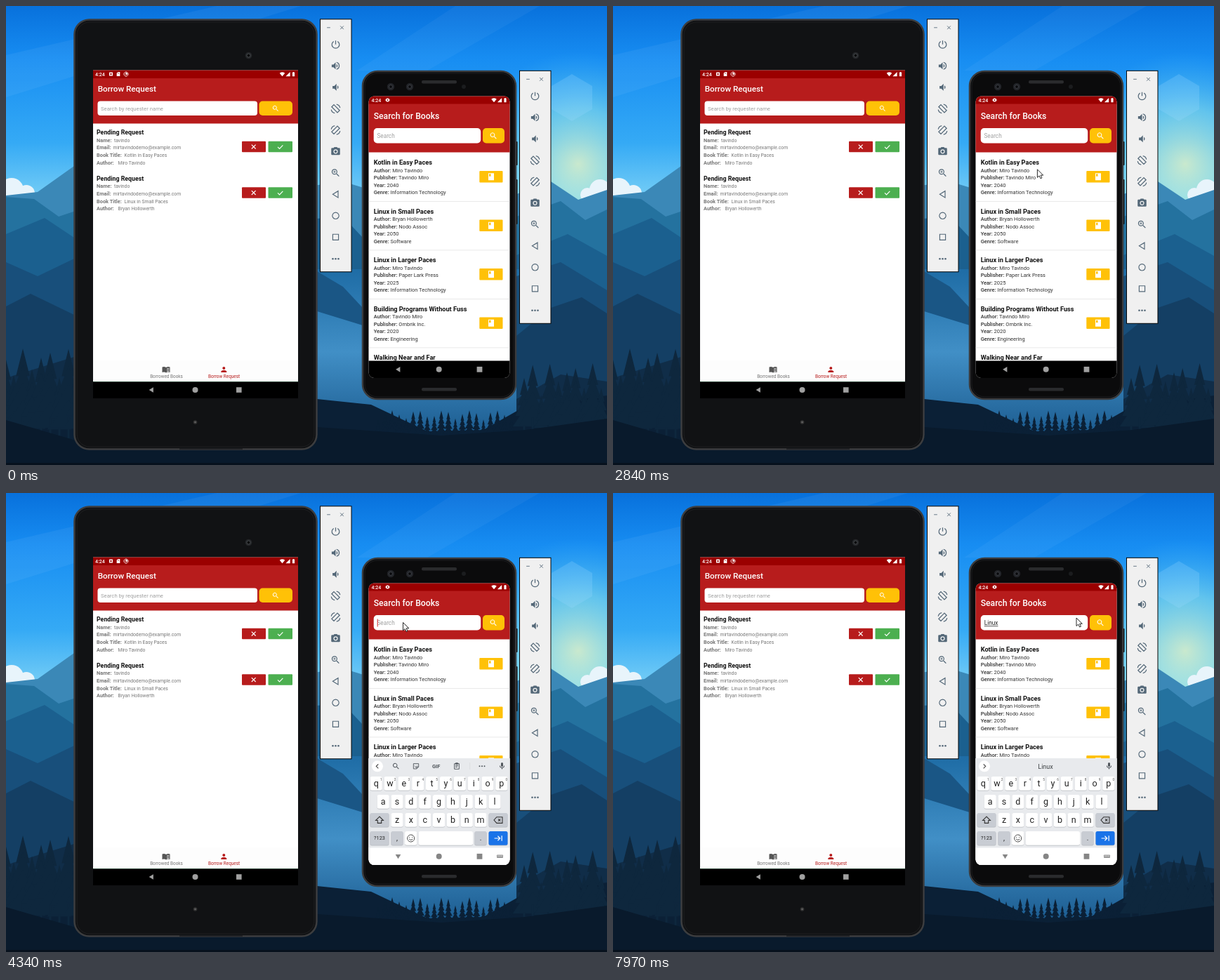
Write an HTML page that moves like this. It is 856 px wide and 654 px high and loops after 8000 ms.

```html
<!DOCTYPE html>
<html lang="en">
<head>
<meta charset="utf-8">
<title>Library app demo</title>
<style>
html, body { margin: 0; width: 100%; height: 100%; overflow: hidden; background: #0b2036; }
svg { display: block; font-family: Roboto, Arial, sans-serif; }
</style>
</head>
<body>
<svg id="stage" width="856" height="654" viewBox="0 0 856 654"></svg>
<script>
const LOOP = 8000, RED = '#b71c1c', DARK_RED = '#9b0000', YELLOW = '#ffc107', SLATE = '#546878';

// Drawing helpers that return SVG markup
const rect = (x, y, w, h, fill, r = 0, more = '') =>
  `<rect x="${x}" y="${y}" width="${w}" height="${h}" fill="${fill}" rx="${r}" ${more}/>`;
const dot = (x, y, r, fill, more = '') => `<circle cx="${x}" cy="${y}" r="${r}" fill="${fill}" ${more}/>`;
const poly = (points, fill, more = '') => `<polygon points="${points}" fill="${fill}" ${more}/>`;
const text = (x, y, size, str, fill = '#333', weight = 400, anchor = 'start') =>
  `<text x="${x}" y="${y}" font-size="${size}" fill="${fill}" font-weight="${weight}" text-anchor="${anchor}">${str}</text>`;
const group = (id, body, more = '') => `<g id="${id}" ${more}>${body}</g>`;
const many = (n, f) => Array.from({ length: n }, (_, i) => f(i)).join('');

// Icons live on a 24 unit grid; a stroke width makes them outlines
const ICON = {
  search: 'M15.5 14h-.8l-.3-.3A6.5 6.5 0 1 0 9.5 16c1.6 0 3.1-.6 4.2-1.6l.3.3v.8l5 5 1.5-1.5zM9.5 14a4.5 4.5 0 1 1 0-9 4.5 4.5 0 0 1 0 9z',
  close: 'M5 5 19 19M19 5 5 19',
  check: 'M4 12.5l5.5 5.5L20 7',
  minus: 'M4 12H20',
  power: 'M12 3v9M7.5 5a8.5 8.5 0 1 0 9 0',
  loud: 'M3 9v6h4l5 5V4L7 9zM16.5 12A4.5 4.5 0 0 0 14 8v8a4.5 4.5 0 0 0 2.500-4zM14 3.200v2.100a7 7 0 0 1 0 13.400v2.100a9 9 0 0 0 0-17.600z',
  quiet: 'M5 9v6h4l5 5V4L9 9zM18.500 12A4.500 4.500 0 0 0 16 8v8a4.500 4.500 0 0 0 2.500-4z',
  left: 'M8 3 21 16 16 21 3 8ZM14 2a10 10 0 0 1 8 8M10 22a10 10 0 0 1-8-8',
  right: 'M16 3 3 16 8 21 21 8ZM10 2a10 10 0 0 0-8 8M14 22a10 10 0 0 0 8-8',
  camera: 'M9 2 7.200 4H4a2 2 0 0 0-2 2v12a2 2 0 0 0 2 2h16a2 2 0 0 0 2-2V6a2 2 0 0 0-2-2h-3.200L15 2zM12 7a5 5 0 1 1 0 10 5 5 0 0 1 0-10zM12 9a3 3 0 1 0 0 6 3 3 0 0 0 0-6z',
  plus: 'M9.500 7v5M7 9.500h5',
  back: 'M18 4V20L5 12Z',
  ring: 'M12 4a8 8 0 1 0 .01 0Z',
  square: 'M5 5H19V19H5Z',
  wifi: 'M0 8Q12-1 24 8L12 22Z',
  signal: 'M2 22H22V2Z',
  battery: 'M7 4h3V2h4v2h3v18H7Z',
  gear: 'M12 3l2 3 4-1 1 4 3 3-3 3-1 4-4-1-2 3-2-3-4 1-1-4-3-3 3-3 1-4 4 1zM12 9a3 3 0 1 0 0 6 3 3 0 0 0 0-6z',
  card: 'M10 2h10v20H4V8zM9 6v4h2V6zm4 0v4h2V6z',
  book: 'M4 2H20V22H4ZM6 4v8l2.500-2 2.500 2V4Z',
  reader: 'M1 5q6-2 11 1 5-3 11-1v15q-6-2-11 1-5-3-11-1ZM14 9v1.500l7-1V8zm0 4v1.500l7-1V12zm0 4v1.500l7-1V16z',
  person: 'M12 12a4 4 0 1 0 0-8 4 4 0 0 0 0 8zM12 14c-3 0-8 1.300-8 4v2h16v-2c0-2.700-5-4-8-4z',
  mic: 'M12 14a3 3 0 0 0 3-3V5a3 3 0 0 0-6 0v6a3 3 0 0 0 3 3zM17 11a5 5 0 0 1-10 0H5a7 7 0 0 0 6 7v3h2v-3a7 7 0 0 0 6-7z',
  sticker: 'M4 4H20V14L14 20H4ZM20 14H14V20M8 9v1M15 9v1M8 13q4 4 7 0',
  clip: 'M5 5H19V21H5ZM9 3h6v4H9ZM8 11h8M8 15h6',
  smile: 'M12 2a10 10 0 1 0 .01 0ZM8 8v2M16 8v2M7 14q5 6 10 0',
  shift: 'M12 3 2 13H7V20H17V13H22Z',
  erase: 'M8 4H23V20H8L1 12ZM12 9l6 6M18 9l-6 6',
  next: 'M2 12H17M11 6l6 6-6 6M21.500 5V19'
};
const icon = (name, x, y, size, color, stroke) =>
  `<path d="${ICON[name]}" transform="translate(${x - size / 2} ${y - size / 2}) scale(${size / 24})" fill-rule="evenodd" ` +
  (stroke ? `fill="none" stroke="${color}" stroke-width="${stroke}"/>` : `fill="${color}"/>`);
const dots = (x, y, color, gap = 4, r = 1.3) => many(3, i => dot(x + (i - 1) * gap, y, r, color));

const pine = (x, base, h, fill) => many(4, i => {
  const top = base - h * (1 - i * .2), w = h * (.08 + i * .045), low = top + h * .32;
  return poly(`${x},${top} ${x + w},${low} ${x - w},${low}`, fill);
}) + rect(x - 1.5, base - h * .2, 3, h * .25, fill);

const landscape = () => `
  <defs>
    <linearGradient id="sky" x2="0" y2="1"><stop stop-color="#0871dc"/><stop offset=".25" stop-color="#178df2"/>
      <stop offset=".65" stop-color="#35aaf5"/><stop offset="1" stop-color="#8cdaf6"/></linearGradient>
    <radialGradient id="glow"><stop stop-color="#e8f5c4" stop-opacity=".8"/><stop offset=".5" stop-color="#9ae8e6" stop-opacity=".5"/>
      <stop offset="1" stop-color="#4cc0f5" stop-opacity="0"/></radialGradient>
    <linearGradient id="lake" x2="0" y2="1"><stop stop-color="#1e6ca5"/><stop offset=".5" stop-color="#418fc6"/><stop offset="1" stop-color="#1c5c90"/></linearGradient>
    <clipPath id="screen">${rect(516.5, 128.5, 201, 401.5, '#000', 8)}</clipPath>
  </defs>` +
  rect(0, 0, 856, 300, 'url(#sky)') +
  poly('0,130 0,70 300,0 420,0', '#fff', 'opacity=".05"') + poly('500,92 640,0 760,0 600,92', '#fff', 'opacity=".04"') +
  dot(815, 225, 160, 'url(#glow)') +
  poly('806,97 835,114 835,147 806,164 777,147 777,114', '#9fdcff', 'opacity=".22"') +
  dot(8, 262, 17, '#e8f4fb') + dot(29, 267, 12, '#e8f4fb') + dot(846, 262, 15, '#e8f4fb') + dot(828, 269, 10, '#e8f4fb') +
  poly('0,270 45,265 97,228 200,290 480,250 640,300 776,250 815,276 856,262 856,400 0,400', '#3b88b7') +
  poly('0,272 40,275 75,300 120,285 500,330 727,300 790,278 825,305 856,290 856,440 0,440', '#24729f') +
  poly('0,325 55,302 97,330 480,300 508,330 727,355 800,325 856,356 856,500 0,500', '#1b608f') +
  rect(400, 375, 350, 235, 'url(#lake)') +
  poly('0,365 45,385 97,360 97,520 0,520', '#184f7b') + poly('727,385 790,365 856,405 856,520 727,520', '#184f7b') +
  poly('443,378 480,400 508,430 508,455 443,435', '#1a5685') +
  poly('0,428 35,410 97,440 97,640 0,640', '#143f64') + poly('727,470 776,430 820,415 856,438 856,640 727,640', '#143f64') +
  poly('0,530 97,500 97,654 0,654', '#102d48') + poly('727,560 790,525 856,535 856,654 727,654', '#102d48') +
  poly('443,560 520,568 600,606 680,604 740,570 856,555 856,654 0,654 0,575', '#0b2036') +
  many(9, i => pine(-2 + i * 13, 610, 72 + 50 * Math.abs(Math.sin(i * 1.9 + 1)), '#0e273d')) +
  many(20, i => pine(530 + i * 10, 612, 22 + 14 * Math.abs(Math.sin(i * 2.3)), '#0b2036')) +
  many(10, i => pine(738 + i * 12.2, 605, 48 + 48 * Math.abs(Math.sin(i * 1.3 + .6)), '#0e273d')) +
  poly('0,590 120,625 443,600 620,612 740,604 856,588 856,654 0,654', '#091a2c') +
  rect(0, 651, 856, 3, '#07111d');

const controls = (x, y) => group('', rect(.5, .5, 44.5, 360, '#f0f0f0', 0, 'stroke="#050505"') +
  icon('minus', 12.5, 12.5, 7, SLATE, 3) + icon('close', 31.5, 12.5, 8, SLATE, 2.8) +
  ['power', 'loud', 'quiet', 'left', 'right', 'camera', 'search', 'back', 'ring', 'square'].map((name, i) =>
    icon(name, 22.5, 36.5 + i * 30.5, i > 6 ? 14 : 15, SLATE, /power|left|right|back|ring|square/.test(name) && 2)).join('') +
  icon('plus', 22.5, 219.500, 15, SLATE, 1.5) + dots(22.5, 342, SLATE), `transform="translate(${x} ${y})"`);

const statusRight = (x, y) => icon('wifi', x - 16, y, 7.5, '#fff') + icon('signal', x - 8, y, 7.5, '#fff') + icon('battery', x, y, 7.5, '#fff');

const request = (y, title, author) =>
  text(129, y, 8.8, 'Pending Request', '#111', 700) +
  [['Name:', 'tavindo', 154], ['Email:', 'mirtavindodemo@example.com', 152.5], ['Book Title:', title, 168.5], ['Author:', author, 159.5]]
    .map(([label, value, x], i) => text(129, y + 10.5 + i * 10.6, 7.4, label, '#777', 700) + text(x, y + 10.5 + i * 10.6, 6.8, value, '#777')).join('') +
  rect(336, y + 9.5, 34, 15.5, RED, 1) + icon('close', 352.7, y + 17.3, 10, '#fff', 2.8) +
  rect(373.5, y + 9.5, 34.5, 15.5, '#4caf50', 1) + icon('check', 390.7, y + 17.3, 11, '#fff', 2.5);

const tablet = () =>
  rect(97.500, 19.500, 345, 612, '#111214', 21, 'stroke="#3c3d3f" stroke-width="2.5"') +
  rect(101, 23, 338, 605, 'none', 18, 'stroke="#1e1f21"') + rect(247, 630, 90, 2, '#202124') +
  dot(345.5, 70.5, 4.8, '#25272a') + dot(345.5, 70.5, 2.5, '#0a0b0d', 'stroke="#44474a"') +
  dot(269.5, 593, 2.8, '#333') + dot(269.5, 593, 1.2, '#666') +
  rect(124, 91.5, 292, 467.5, '#fff') + rect(124, 91.5, 292, 12, DARK_RED) + rect(124, 103, 292, 64.5, RED) +
  text(127, 99.700, 7, '4:24', '#fff', 500) + rect(147, 94.500, 5, 5, '#fff', .5) + dot(149.5, 97, 1.2, DARK_RED) +
  icon('card', 160, 97, 7, '#fff') + icon('ring', 171, 97, 9, '#fff', 2.5) + dot(171.5, 96.500, 1.500, '#fff') + statusRight(409.5, 97) +
  text(130.7, 122, 11.7, 'Borrow Request', '#fff', 500) +
  rect(130.5, 135.5, 227.5, 20.5, '#fff', 4) + text(135, 148.5, 7.7, 'Search by requester name', '#a0a0a0') +
  rect(360.5, 135.5, 47.5, 20.5, YELLOW, 5) + icon('search', 384, 146, 11, '#fff') +
  request(183.3, 'Kotlin in Easy Paces', 'Miro Tavindo') + request(248.8, 'Linux in Small Paces', 'Bryan Hollowerth') +
  rect(124, 505, 292, 30, '#fdfdfd') +
  icon('reader', 228, 518, 12, '#555') + text(228.5, 530, 6.4, 'Borrowed Books', '#777', 400, 'middle') +
  icon('person', 310.300, 518, 12, RED) + text(310.5, 530, 6.4, 'Borrow Request', RED, 400, 'middle') +
  rect(124, 535, 292, 24, '#000') + rect(124, 535, 292, .6, '#4a7a60') +
  icon('back', 207, 547, 11.5, '#a0a0a0') + dot(269.5, 547, 4, '#a0a0a0') + rect(328, 543.2, 7.6, 7.6, '#a0a0a0');

const books = [
  ['Kotlin in Easy Paces', 'Miro Tavindo', 'Tavindo Miro', 2040, 'Information Technology'],
  ['Linux in Small Paces', 'Bryan Hollowerth', 'Nodo Assoc', 2050, 'Software'],
  ['Linux in Larger Paces', 'Miro Tavindo', 'Paper Lark Press', 2025, 'Information Technology'],
  ['Building Programs Without Fuss', 'Tavindo Miro', 'Ombrik Inc.', 2020, 'Engineering'],
  ['Walking Near and Far', '', '', '', '']
];
const bookRow = ([title, ...values], i) => {
  const y = 208.5 + i * 69.5;
  return text(523.7, y + 17.5, 9.2, title, '#111', 700) +
    ['Author', 'Publisher', 'Year', 'Genre'].map((label, k) =>
      text(523.7, y + 28.2 + k * 10.5, 7.5, `<tspan font-weight="500">${label}:</tspan> ${values[k]}`)).join('') +
    rect(674.3, y + 26.5, 33.2, 16.6, YELLOW, 1) + icon('book', 691, y + 34.8, 12, '#fff') +
    rect(516.5, y + 69.5, 201, .8, '#e4e4e4');
};

const key = (x, y, w, label, fill = '#fff', size = 12.5) =>
  rect(x - w / 2, y - 9.5, w, 20, '#b8bbc0', 2.5) + rect(x - w / 2, y - 10, w, 19.7, fill, 2.5) +
  text(x, y + size * .33, size, label, '#222', 400, 'middle');
const letters = (row, x, y) => [...row].map((c, i) => key(x + i * 19.85, y, 17.2, c)).join('');

const keyboard = () => {
  const gray = '#c8ccd3', ink = '#50565c';
  return rect(516, 378, 202, 128, '#e8eaed') + rect(516, 505.5, 202, 70, '#fff') +
    dot(529, 389.3, 8, '#fff') + '<path id="chevron" fill="none" stroke="#444" stroke-width="1.1"/>' +
    group('tools', icon('search', 555.5, 389.3, 12, ink) + icon('sticker', 584, 389.3, 11, ink, 2) +
      text(612.700, 392, 7.5, 'GIF', ink, 700, 'middle') + icon('clip', 642, 389, 11.5, ink, 2) +
      rect(660.5, 384, .6, 10, '#d4d6da') + dots(678, 389.3, ink, 3.5, 1)) +
    group('hints', [561, 616, 671].map(x => text(x, 392.8, 9, '', '#3c4043', 400, 'middle')).join('') +
      group('bars', rect(587.5, 383, .7, 13, '#c4c7cc') + rect(642.5, 383, .7, 13, '#c4c7cc'))) +
    icon('mic', 706.5, 389, 12, ink) +
    letters('qwertyuiop', 527.2, 414) + many(10, i => text(534.2 + i * 19.85, 409.500, 4.6, (i + 1) % 10, '#555', 400, 'middle')) +
    letters('asdfghjkl', 537.2, 440) + letters('zxcvbnm', 557, 466) +
    key(532, 466, 27, '', gray) + icon('shift', 532, 466, 13, '#333', 2) +
    key(701, 466, 27, '', gray) + icon('erase', 701, 466, 13, '#333', 2) +
    key(532, 492, 27, '?123', gray, 7.3) + key(557, 492, 17.2, ',', gray, 10) +
    key(576.700, 492, 17.2, '') + icon('smile', 576.700, 492, 12, '#444', 2) + key(626.300, 492, 77.500, '') +
    key(676, 492, 17.2, '.', gray, 10) + key(701, 492, 27, '', '#1a73e8') + icon('next', 701, 492, 13, '#fff', 2.2);
};

const phone = () =>
  rect(725, 193, 3.500, 34, '#111', 1) + rect(725, 247, 3.500, 64, '#111', 1) +
  rect(508, 93, 218, 467, '#0b0b0c', 21, 'stroke="#3a3b3d" stroke-width="2.5"') +
  rect(511, 96, 212, 461, 'none', 18, 'stroke="#1c1d1f"') +
  rect(592, 106, 50, 4.5, '#2a2b2d', 2) + rect(592, 544, 50, 4.5, '#2a2b2d', 2) +
  [548, 575].map(x => dot(x, 115, 5.2, '#222428') + dot(x, 115, 2.5, '#0a0b0e', 'stroke="#3b3e44"')).join('') + dot(652, 115, 3, '#1b1c1e') +
  group('view', rect(516, 128, 202, 403, '#fff') + rect(516, 128, 202, 12, DARK_RED) + rect(516, 139.500, 202, 69, RED) +
    text(520.5, 136.700, 7, '4:24', '#fff', 500) + icon('gear', 543.5, 134, 8, '#fff') + statusRight(711, 134) +
    text(523.7, 160.5, 12.2, 'Search for Books', '#fff', 500) +
    rect(523.7, 174, 152.5, 21.5, '#fff', 5) + rect(679, 174, 31, 21.5, YELLOW, 5) + icon('search', 694.3, 185, 12.5, '#fff') +
    text(528.5, 188, 8.2, 'Search', '#a0a0a0').replace('<text', '<text id="hintText"') +
    text(528.7, 188, 8.3, '', '#222').replace('<text', '<text id="typed"') +
    rect(528.7, 189.3, 0, .8, '#333').replace('<rect', '<rect id="underline"') +
    rect(528.7, 179.500, 1, 11, '#d93030').replace('<rect', '<rect id="caret"') +
    books.map(bookRow).join('') +
    group('cover', rect(516, 378, 202, 153, '#fff')) + group('keys', keyboard()) +
    group('navBar', rect(516, 505.5, 202, 25, '#000')) +
    group('navIcons', group('backIcon', icon('back', 0, 0, 11.5, 'inherit').replace(' fill="inherit"', '')) +
      '<circle cx="616.7" cy="517.8" r="4"/><rect x="670.600" y="513.900" width="7.800" height="7.800"/>') +
    group('switcher', rect(699, 515.500, 9, 4.500, '#999', .8) + many(3, i => rect(700.300 + i * 2.500, 516.700, 1.300, 1, '#fff'))),
    'clip-path="url(#screen)"');

document.getElementById('stage').innerHTML = landscape() + tablet() + controls(447, 18.3) + phone() + controls(731, 91.8) +
  '<path id="pointer" d="M0 0V11.500L2.700 9.100 4.600 13 6.500 12.100 4.700 8.300H8.300Z" fill="#fff" stroke="#111" stroke-width=".9"/>';

const el = Object.fromEntries([...document.querySelectorAll('[id]')].map(e => [e.id, e]));
const show = (e, on) => e.style.display = on ? '' : 'none';

// Pointer path as time, x, y
const path = [
  [510, 827, 641], [570, 843, 641], [690, 843, 641], [880, 765, 565], [1060, 688, 512], [1190, 672, 537.5],
  [1440, 672, 537.5], [1800, 702, 572], [2090, 721, 597], [2330, 721, 597], [2390, 729, 594], [2840, 604.5, 233],
  [3160, 571, 176], [3210, 571, 174.5], [3290, 571, 174.5], [3540, 565.5, 184.5], [7590, 565.5, 184.5], [7970, 660, 178]
];
const pointAt = t => {
  const i = path.findIndex(p => p[0] > t);
  if (i < 0) return path.at(-1).slice(1);
  const [a, b] = [path[i - 1], path[i]], k = (t - a[0]) / (b[0] - a[0]);
  return [1, 2].map(n => a[n] + (b[n] - a[n]) * k);
};

// Step lists: the latest entry not after t wins
const latest = (steps, t) => steps.findLast(s => s[0] <= t)[1];
const typing = [[0, ''], [5330, 'L'], [5580, 'Li'], [6710, 'Lin'], [6835, 'Linu'], [6960, 'Linux']];
const underlined = [[0, 0], [5580, 1], [5830, 2], [6710, 3], [6960, 4], [7150, 5]];
const blink = [[0, false], [3840, true], [4400, false], [4900, true], [6330, false], [6710, true], [7650, false]];
const hints = [[0, ['', '', '']], [5580, ['Like', 'L', 'Let']], [5830, ['Lil', 'Li', 'Like']], [6710, ['Line', 'Lin', 'Link']],
  [6835, ['Lin', 'Linu', 'Link']], [6960, ['Linu', 'Linux', 'Linus']], [7150, ['', 'Linux', '']]];
const hintSlots = el.hints.querySelectorAll('text');

function draw(t) {
  show(el.pointer, t >= 510);
  if (t >= 510) el.pointer.setAttribute('transform', `translate(${pointAt(t)})`);

  const word = latest(typing, t), count = Math.min(latest(underlined, t), word.length);
  el.typed.textContent = word;
  show(el.hintText, !word);
  const width = word ? el.typed.getComputedTextLength() : 0;
  el.underline.setAttribute('width', count ? el.typed.getSubStringLength(0, count) : 0);
  el.caret.setAttribute('x', 528.7 + width);
  show(el.caret, latest(blink, t));

  const p = Math.min(1, Math.max(0, (t - 4080) / 200)), open = t >= 4080;
  show(el.cover, open);
  show(el.keys, open);
  el.keys.setAttribute('transform', `translate(0 ${130 * (1 - p) ** 1.65})`);
  el.keys.setAttribute('opacity', Math.min(1, .3 + p * .86));
  el.navBar.setAttribute('opacity', Math.max(0, 1 - p * 1.4));
  el.navIcons.setAttribute('fill', open ? '#858585' : '#a0a0a0');
  el.backIcon.setAttribute('transform', `translate(558.5 517.8) rotate(${open ? -90 : 0})`);
  show(el.switcher, open);

  const suggesting = t >= 5580;
  show(el.tools, !suggesting);
  show(el.hints, suggesting);
  show(el.bars, t < 7150);
  el.chevron.setAttribute('d', suggesting ? 'M527.7 386.3l3 3-3 3' : 'M530.3 386.3l-3 3 3 3');
  latest(hints, t).forEach((s, i) => hintSlots[i].textContent = s);
}

const start = performance.now();
(function tick() {
  draw((performance.now() - start) % LOOP);
  requestAnimationFrame(tick);
})();
</script>
</body>
</html>
```
